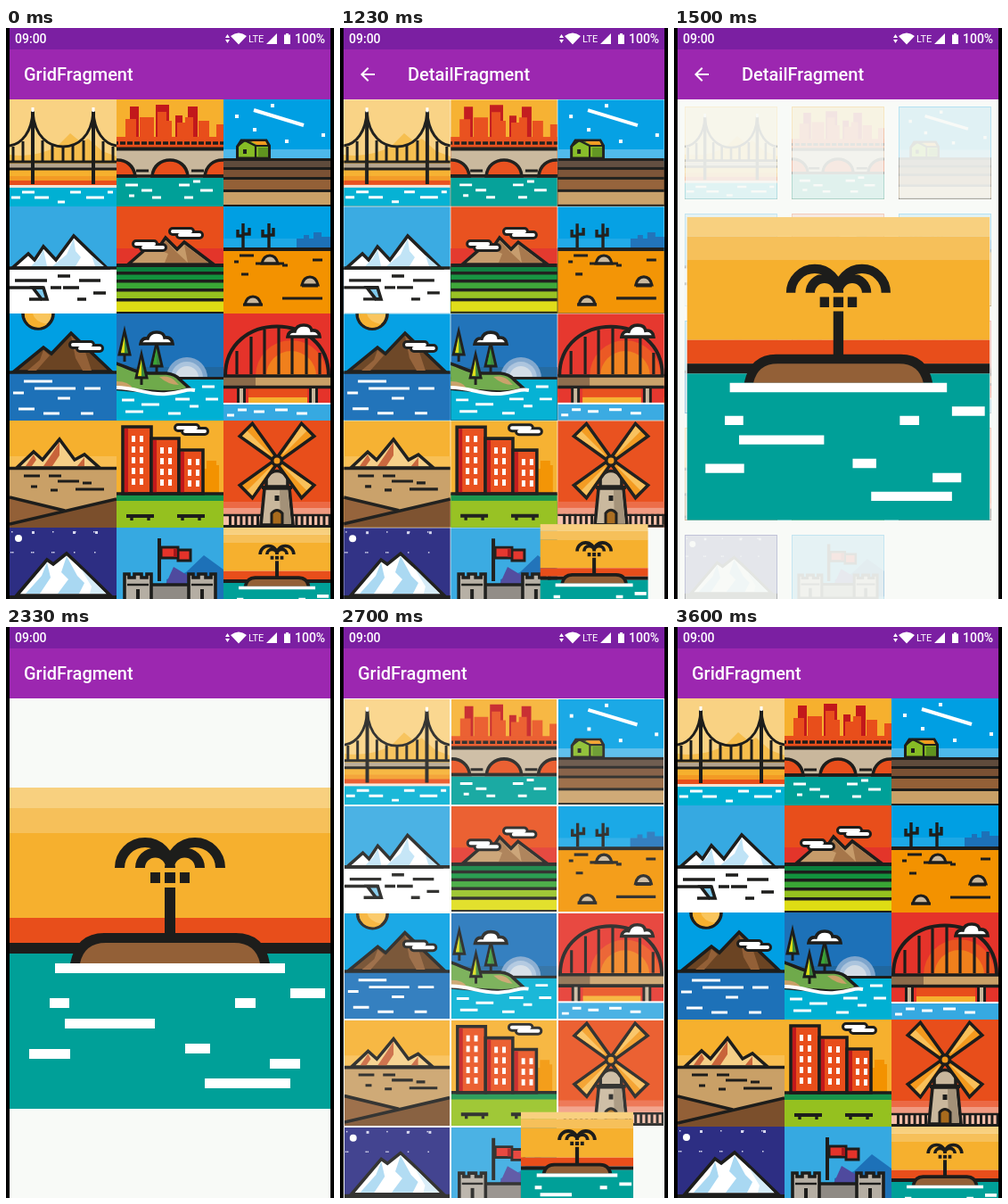
These frames come from a looping animation (368 px wide and 640 px high, 4.23 s). An HTML page with a canvas:

```html
<!DOCTYPE html>
<html lang="en">
<head>
<meta charset="utf-8">
<title>Grid to detail</title>
<style>
html, body { margin: 0; width: 100%; height: 100%; overflow: hidden; background: #000 }
canvas { display: block }
</style>
</head>
<body>
<canvas id="stage" width="368" height="640"></canvas>
<script>
const c = document.getElementById('stage').getContext('2d');
const LOOP = 4230, PAPER = '#f8faf7';
const K = '#1d1d1b', W = '#fff', YELLOW = '#f6b02e', ORANGE = '#e84e1b', TAN = '#c9a067',
  STONE = '#c9b79c', BROWN = '#936037', DARK = '#6b4423', SKY = '#009fe3', SOFT = '#36a9e1',
  BLUE = '#1d71b8', CYAN = '#00b0d3', TEAL = '#00a098';

// Drawing helpers; every tile uses a 120 x 120 space.
function rect(color, x, y, w, h) {
  c.fillStyle = color;
  c.fillRect(x, y, w, h);
}
function fill(color, d) {
  c.fillStyle = color;
  c.fill(new Path2D(d));
}
function disc(color, x, y, r) {
  c.fillStyle = color;
  c.beginPath();
  c.arc(x, y, r, 0, 7);
  c.fill();
}
function line(d, w = 3.6, color = K, cap = 'butt') {
  c.lineWidth = w;
  c.strokeStyle = color;
  c.lineCap = cap;
  c.stroke(new Path2D(d));
}
function shape(color, d, w) {
  fill(color, d);
  line(d, w);
}
// Pairs of colour and top edge, each running to the bottom.
function bands(...list) {
  for (let i = 0; i < list.length; i += 2) rect(list[i], 0, list[i + 1], 120, 120 - list[i + 1]);
}
function cloud(x, y) {
  const d = `M${x + 5} ${y}h20M${x + 13} ${y + 4}h22`;
  line(d, 10, K, 'round');
  line(d, 4, W, 'round');
}
function puff(x, y) {
  shape(W, `M${x} ${y}q1-7 8-6q2-7 10-7q8 0 9 6q8-1 9 7Z`);
}

function cableBridge() {
  bands('#f9d283', 0);
  fill('#f6bd4c', 'M0 62Q30 66 54 52L68 38 80 48 88 44 104 58 120 64V84H0Z');
  bands(YELLOW, 79, '#f39a24', 86, ORANGE, 91, '#fbe3d5', 96, CYAN, 99);
  rect('#b5a48d', 0, 72, 120, 5);
  line('M0 70H120M0 78H120', 3);
  line('M26 13V95M94 13V95', 4);
  line('M0 52C14 50 25 36 26 14C28 42 44 53 60 53S92 42 94 14C95 36 106 50 120 52', 3);
  line('M4 53V70M15 47V70M37 46V70M48 52V70M60 54V70M71 52V70M83 46V70M105 47V70M116 53V70', 3);
  line('M26 9v5M94 9v5', 3, W);
  line('M14 104h14M2 110h10M28 110h16M68 104h12M54 115h8M86 110h20M110 104h6', 3, W);
}

function archBridge() {
  bands(YELLOW, 0);
  fill('#c2181b', 'M15 50V8H25V50ZM44 50V6H59V50ZM80 50V8H91V50ZM66 50V18H74V50Z');
  fill(ORANGE, 'M10 50V22H22V50ZM26 50V20H42V50ZM46 50V14H56V24H62V50ZM68 50V26H77V50ZM77 50V20H86V50ZM92 50V24H104V50ZM112 50V28H120V50Z');
  bands(ORANGE, 42, STONE, 55, TEAL, 88);
  line('M0 49H120', 3.6);
  for (let x = 2; x < 120; x += 8) rect(ORANGE, x, 47, 2, 4);
  line('M0 55.5H120', 4);
  shape(ORANGE, 'M40 86C42 62 78 62 80 86Z');
  shape(ORANGE, 'M-20 86C-15 62 18 62 21 86ZM99 86C102 62 134 62 140 86Z');
  line('M0 86H120', 3.6);
  line('M22 80h14M84 80h14', 3);
  line('M10 96h14M28 102h12M14 108h6M70 96h12M86 92h8M94 102h14M76 110h10M40 110h10', 3, W);
}

function farm() {
  bands(SKY, 0, '#4db8ea', 56, K, 66, '#5f4b3c', 69, K, 76, '#7a5134', 79, K, 87, BROWN, 90, K, 101, TAN, 104, K, 118);
  line('M34 12L90 29', 4, W);
  for (const [x, y] of [[53, 5], [13, 17], [33, 32], [69, 45], [110, 38]]) rect(W, x, y, 4, 4);
  shape('#86bc25', 'M15.5 66V53L20 46H48L51.5 52V66Z', 3);
  fill('#f39a1e', 'M21 47H47L49 51H38L31 47Z');
  line('M15 53L24 46L36 52V66M36 52H52', 2.2);
  rect('#5f941f', 39, 54, 11, 10);
  line('M24 56v5', 4);
}

function snow() {
  bands(SOFT, 0, W, 69);
  shape(W, 'M3 69L21 53 28 60 38 45 52 60 72 33 109 69Z');
  fill('#bfe3f6', 'M38 48L33 58 24 67H42ZM72 36L64 54 48 67H74L80 57 74 50ZM92 55L96 67H106Z');
  line('M0 69H120');
  shape('#7cc8ec', 'M38 91H26L36 104 42 104Z');
  line('M6 83h36M0 91h38M22 104h14M46 91h12M54 78h14M78 83h24M60 91h18M94 97h14M76 104h10', 3.4);
}

function fields() {
  bands(ORANGE, 0, '#e3352a', 47);
  shape('#c69b6a', 'M13 65L36 45 46 48 55 35 68 48 76 40 109 65Z');
  fill('#a6764a', 'M55 38L51 50 58 53 54 63H80L66 50ZM76 43L80 63H103Z');
  cloud(17, 42);
  cloud(58, 28);
  bands(K, 64, '#0a7f3c', 68, K, 73, '#12923d', 76.5, K, 82, '#3aa635', 85.5, K, 92, '#95c11f', 95.5, K, 103, '#dedc14', 106.5, K, 118);
}

function desert() {
  bands(SKY, 0, '#1da8e6', 36);
  fill(BLUE, 'M82 48V36H90V32H96V36H101V29H110V34H120V48Z');
  bands(K, 46, '#f39200', 50);
  line('M22 19V46M16 26V33H22M29 24V31H22M51 19V46M44 26V33H51M56 24V32H51', 3.4);
  for (const [x, y] of [[52, 64], [97, 88], [33, 110]])
    shape(STONE, `M${x - 9} ${y}Q${x - 7} ${y - 9} ${x} ${y - 9}T${x + 9} ${y}Z`, 3.2);
  line('M18 55h16M12 62h5M66 66h6M100 60h11M20 76h8M36 64h32M66 103h45M88 89h18M22 110h22', 3.2);
}

function lake() {
  bands(SKY, 0, BLUE, 66);
  shape('#f9c55c', 'M15 0A16 16 0 0 0 49 0V-9H15Z');
  fill('#f6b02e', 'M17 0A15 15 0 0 0 42 12Q28 9 26 0Z');
  shape(DARK, 'M5 65L38 38 47 45 69 22 114 65Z');
  fill(BROWN, 'M38 41L45 47 30 64H20L34 52ZM69 25L84 40 92 64H82L74 50Z');
  cloud(66, 35);
  line('M0 66H120');
  line('M16 76h32M28 84h46M4 89h12M84 84h18M10 107h18M38 112h18M54 95h14M80 112h14', 3, W);
}

function coast() {
  bands(BLUE, 0, '#20679f', 60);
  disc('#7fa6cd', 79, 72, 23);
  disc('#abc4dd', 79, 72, 18);
  disc('#d3dde6', 79, 72, 13);
  bands(K, 71, CYAN, 74);
  shape('#6faa4b', 'M-4 55C10 58 20 67 36 67H56Q66 68 71 74L82 84Q70 89 50 88T-4 84Z');
  fill(TAN, 'M48 71Q58 69 64 74L70 80Q58 80 48 71ZM0 76Q14 76 18 84H0Z');
  line('M-2 83C20 82 34 92 56 90S76 84 88 86', 4, W);
  for (const [x, y, color] of [[9, 20, '#dedc14'], [45, 33, '#3aa635'], [28, 46, '#dedc14']]) {
    line(`M${x} ${y + 26}v8`, 3);
    shape('#3c8a3c', `M${x} ${y}L${x + 6} ${y + 26}H${x - 6}Z`, 3);
    fill(color, `M${x} ${y + 5}V${y + 24}H${x - 4}Z`);
  }
  puff(27, 34);
  line('M6 97h14M28 102h20M10 110h20M66 96h16M96 82h14M82 104h10M100 96h14M58 112h14', 3, W);
}

function steelBridge() {
  bands('#e5332a', 0);
  fill('#ea5520', 'M36 70A40 40 0 0 1 116 70Z');
  fill('#f0801c', 'M48 120V70A28 28 0 0 1 104 70V102H48Z');
  bands(ORANGE, 82, YELLOW, 94);
  fill('#e5332a', 'M0 82H28V102H0ZM94 82H120V102H94Z');
  line('M2 70C2 -4 118 -4 118 70', 4);
  line('M15 42V68M31 26V68M46 18V68M62 16V68M77 20V68M93 28V68M108 44V68', 3.2);
  rect(TAN, 0, 70, 120, 12);
  rect('#8b6b4a', 0, 70, 36, 12);
  line('M0 70H120M0 82.5H120', 3.6);
  line('M20 84V101M101 84V101', 10);
  line('M20 84V101M101 84V101', 4, STONE);
  bands(W, 100, SOFT, 102);
  line('M16 108h10M34 110h12M58 108h14M82 112h12M4 114h8', 3, W);
  puff(72, 26);
}

function plain() {
  bands(YELLOW, 0, '#f8be52', 40, TAN, 53);
  shape('#f5cf87', 'M8 53L27 35 37 44 56 21 73 44 84 38 101 53Z');
  fill('#c8643a', 'M27 38L18 51H25L30 44ZM56 24L47 38 38 51H48L56 39ZM84 41L76 51H84Z');
  line('M0 53.5H120');
  line('M16 62h18M44 62h14M54 68h24M24 74h7M82 70h10M74 77h32M46 78h8', 3.2);
  fill(BROWN, 'M0 87L62 102 0 117Z');
  fill('#7b4f2c', 'M0 120V116L120 88V120Z');
  line('M0 86L62 101M0 116L120 88', 3.6);
}

function towers() {
  bands(YELLOW, 0);
  fill('#f39200', 'M97 82V54H101V45H112V50H115V82Z');
  bands('#18934a', 82, '#95c11f', 90);
  for (const [x, y, w] of [[7, 7, 32], [39, 20, 31], [70, 33, 27]]) {
    shape(ORANGE, `M${x} 82V${y}h${w}V82Z`);
    rect('#c2181b', x + 2, y + 2, 4, 80 - y);
    for (let j = y + 10; j < 74; j += 12)
      for (let i = 10; i < w - 5; i += 9) rect(W, x + i, j, 4, 7);
  }
  line('M0 82H120', 3.6);
  cloud(64, 8);
  line('M11 107h31M68 107h31', 4);
  line('M17 107v5M36 107v5M74 107v5M93 107v5', 3.4);
}

function windmill() {
  bands(ORANGE, 0, '#ec6a45', 91, '#f19a80', 98, '#f6bfa9', 106);
  line('M0 106H120', 2.4);
  for (let x = 6; x < 120; x += 6.2) rect(K, x, 105, 3, 12);
  bands(K, 117);
  shape(STONE, 'M46 76H74L78 117H42Z');
  shape(STONE, 'M48 74V63Q60 50 72 63V74Z');
  fill('#a39178', 'M63 78H72L76 116H64Z');
  line('M43 75H77', 4);
  shape('#a86b1d', 'M54 117V104Q60 97 66 104V117Z', 3);
  line('M60 84v6', 5);
  for (let i = 0; i < 4; i++) {
    c.save();
    c.translate(60, 45);
    c.rotate(Math.PI * (i / 2 + .25));
    shape('#f39a1e', 'M-2 0L-10-49H10L2 0Z');
    fill('#f9c05a', 'M-1-10L-8-47H0V-10Z');
    c.restore();
  }
  disc(K, 60, 45, 7);
  disc('#f39a1e', 60, 45, 3.5);
}

function night() {
  bands('#2d2e83', 0);
  for (let i = 1; i < 16; i++) rect('#d5d6ee', i * 47 % 117, 4 + i * 23 % 46, i % 4 ? 1.5 : 3, i % 4 ? 1.5 : 3);
  disc(W, 10, 12, 4);
  shape(W, 'M8 76L42 36 49 41 64 29 78 42 113 76Z');
  fill('#a9d8f2', 'M42 39L36 54 18 74H34L46 56ZM64 32L58 50 66 58 54 74H78L84 62 76 54Z');
  fill('#d5ecf8', 'M80 46L92 66 90 74H108Z');
  bands(K, 76);
}

function castle() {
  bands(SOFT, 0);
  fill(BLUE, 'M56 80V58L78 50 98 31 120 47V80Z');
  fill('#4f4a9e', 'M54 66L64 44 84 56 74 66Z');
  shape('#e5332a', 'M50 22H69V34H50ZM69 25H83V37H69Z', 3);
  rect('#a5161a', 64, 24, 4, 9);
  line('M48 12V60', 4);
  shape('#8f8a84', 'M36 82V64H86V82Z');
  for (const x of [9, 81]) {
    shape('#b5aea3', `M${x} 82V52h5v4h6v-4h8v4h6v-4h5V82Z`);
    line(`M${x + 3} 64h24`, 2.4);
    line(`M${x + 15} 69v13`, 4);
  }
}

function island() {
  c.save();
  c.scale(1 / 3, 1 / 3);
  const bar = (color, y, h) => rect(color, 0, y, 360, h);
  bar('#f8d07f', 0, 23);
  bar('#f6c05a', 23, 28);
  bar(YELLOW, 51, 95);
  bar(ORANGE, 146, 28);
  bar(K, 174, 12);
  bar(TEAL, 186, 174);
  line('M123.5 90a28.5 28.5 0 0 1 57 0M179.5 90a28.5 28.5 0 0 1 57 0M146.5 90a17 17 0 0 1 34 0M179.5 90a17 17 0 0 1 34 0', 11);
  line('M158 101h11M174 101h12M191 101h11', 12);
  line('M180 112V167', 12);
  fill(K, 'M68 197Q75 163 106 163H254Q286 163 292 197Z');
  fill(BROWN, 'M79 197Q84 174 108 174H252Q276 174 281 197Z');
  line('M51 202.5h258M315 230.5h39M45 241.5h22M253 241.5h23M62 264.5h101M22 298.5h46M197 292.5h28M292 309.5h34M219 331.5h96', 11, W);
  c.restore();
}

const tiles = [cableBridge, archBridge, farm, snow, fields, desert, lake, coast, steelBridge,
  plain, towers, windmill, night, castle];

// Draws a tile by its centre; the veil fades it towards the paper.
function place(draw, cx, cy, size, veil = 0) {
  c.save();
  c.translate(cx - size / 2, cy - size / 2);
  c.scale(size / 120, size / 120);
  c.beginPath();
  c.rect(0, 0, 120, 120);
  c.clip();
  draw();
  c.globalAlpha = veil;
  rect(PAPER, 0, 0, 120, 120);
  c.restore();
}

// cubic-bezier(.4, 0, .2, 1)
function ease(x) {
  if (x <= 0) return 0;
  if (x >= 1) return 1;
  let lo = 0, hi = 1, u;
  for (let i = 0; i < 24; i++) {
    u = (lo + hi) / 2;
    const v = 1 - u;
    if (1.2 * v * v * u + .6 * v * u * u + u * u * u < x) lo = u;
    else hi = u;
  }
  return u * u * (3 - 2 * u);
}

function text(s, x, y, size, weight = 500) {
  c.font = `${weight} ${size}px Roboto, sans-serif`;
  c.fillText(s, x, y);
}

function header(detail) {
  rect('#7b1fa2', 0, 0, 368, 24);
  rect('#9c27b0', 0, 24, 368, 56);
  c.fillStyle = W;
  text('09:00', 10, 17, 14);
  text('LTE', 272, 16, 11, 400);
  text('100%', 324, 17, 14);
  fill(W, 'M246 11L248.5 7 251 11ZM246 13H251L248.5 17ZM252 9Q261 2 270 9L261 18.5ZM292 18L304 6V18ZM312 7.5H314V6H317V7.5H319V18H312Z');
  text(detail ? 'DetailFragment' : 'GridFragment', detail ? 76 : 20, 59, 20);
  if (detail) {
    c.save();
    c.translate(19, 40);
    fill(W, 'M20 11H7.83l5.59-5.59L12 4l-8 8 8 8 1.41-1.41L7.83 13H20Z');
    c.restore();
  }
}

function frame(now) {
  const t = now % LOOP, back = t >= 2330;
  const move = back ? 1 - ease((t - 2430) / 375) : ease((t - 1198) / 460);
  const fade = back ? 1 - ease((t - 2430) / 435) : ease((t - 1185) / 490);

  rect(PAPER, 0, 0, 368, 640);
  if (fade < 1)
    tiles.forEach((draw, i) =>
      place(draw, 64 + i % 3 * 120, 140 + Math.floor(i / 3) * 120, 120 * (1 - .15 * fade), fade));

  // The picked tile travels along a quarter ellipse while it grows.
  const across = Math.sqrt(1 - (1 - move) ** 2);
  const grow = move - .6 * move * (1 - move) ** 4;
  place(island, 304 - 120 * across, 620 - 260 * move, 120 + 240 * grow);

  header(t >= 970 && !back);
  rect('#000', 0, 0, 4, 640);
  rect('#000', 364, 0, 4, 640);
}

const start = performance.now();
function tick() {
  frame(performance.now() - start);
  requestAnimationFrame(tick);
}
tick();
</script>
</body>
</html>
```
